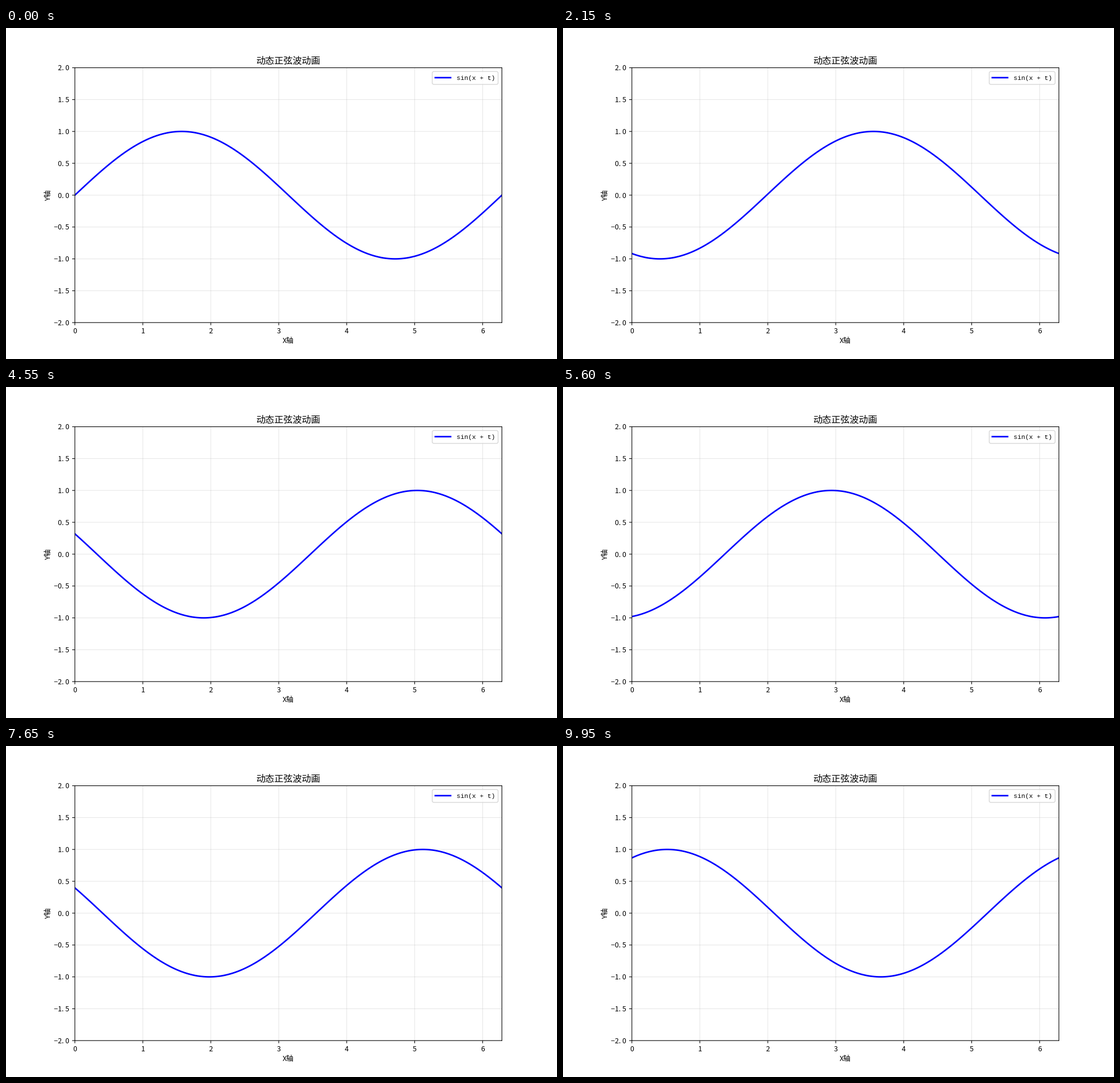
Recreate the animation shown at these times as a matplotlib script. Size 966x580 px, loop 10000 ms.

```python
import matplotlib.pyplot as plt
import numpy as np
from matplotlib.animation import FuncAnimation
from matplotlib.lines import Line2D
from matplotlib.patches import FancyBboxPatch
from matplotlib.transforms import Affine2D

W, H, DPI = 966, 580, 96
FRAMES, INTERVAL = 200, 50
PHASE_STEP = 0.1
SANS, MONO = "Noto Sans CJK JP", "Liberation Mono"
LEFT, RIGHT, TOP, BOTTOM = 0.125 * W, 0.9 * W, 0.12 * H, 0.89 * H
TICK = 4.7

# Keep lines at their true subpixel positions
plt.rcParams["path.snap"] = False
plt.rcParams["path.simplify"] = False

fig = plt.figure(figsize=(W / DPI, H / DPI), dpi=DPI, facecolor="white")
ax = fig.add_axes([0.125, 0.11, 0.775, 0.77])

# Stage pixels, measured from the top left corner
stage = Affine2D().scale(1, -1).translate(0, H).scale(1 / DPI) + fig.dpi_scale_trans


def label(x, y, text, size, ha="center", font=SANS, rotation=0):
    """Write text with its baseline at stage position (x, y)."""
    fig.text(x, y, text, transform=stage, fontsize=size, family=font,
             ha=ha, va="baseline", rotation=rotation,
             rotation_mode="anchor", color="black")


def segment(x0, y0, x1, y1, color="black", width=0.8, cap="butt"):
    fig.add_artist(Line2D([x0, x1], [y0, y1], transform=stage, color=color,
                          linewidth=width, solid_capstyle=cap))


def tick_text(value):
    """One decimal, with the wide period of a half-width font."""
    return f"{value:.1f}".replace("-", "\u2212").replace(".", ". ")


def draw_axes():
    ax.set_xlim(0, 2 * np.pi)
    ax.set_ylim(-2, 2)
    ax.set_xticks(np.arange(7))
    ax.set_yticks(np.arange(-2, 2.1, 0.5))
    ax.tick_params(length=0, labelleft=False, labelbottom=False)
    ax.grid(True, alpha=0.3)

    for n in ax.get_xticks():
        x = LEFT + (RIGHT - LEFT) * n / (2 * np.pi)
        segment(x, BOTTOM, x, BOTTOM + TICK)
        label(x, 534.6, str(int(n)), 9.3)
    for v in ax.get_yticks():
        y = BOTTOM + (TOP - BOTTOM) * (v + 2) / 4
        segment(LEFT - TICK, y, LEFT, y)
        label(111.2, y + 4.6, tick_text(v), 9.3, ha="right")

    label(495, 62.5, "动态正弦波动画", 12.08)
    label(495, 552.2, "X轴", 9.5)
    label(77.6, 293, "Y轴", 9.5, rotation=90)


def draw_legend():
    fig.add_artist(FancyBboxPatch(
        (747.3, 76.3), 115.4, 22.5, transform=stage,
        boxstyle="round,pad=0,rounding_size=2.68",
        facecolor=(1, 1, 1, 0.8), edgecolor=(0.8, 0.8, 0.8, 0.8), linewidth=1))
    segment(752.6, 87, 779.5, 87, "blue", 2, "projecting")
    label(790.2, 91.4, "sin(x + t)", 8.4, ha="left", font=MONO)


draw_axes()
draw_legend()

xs = np.linspace(0, 2 * np.pi, 200)
wave, = ax.plot(xs, np.sin(xs), color="blue", linewidth=2)


def update(frame):
    wave.set_ydata(np.sin(xs + frame * PHASE_STEP))
    return wave,


anim = FuncAnimation(fig, update, frames=FRAMES, interval=INTERVAL,
                     repeat=True, repeat_delay=0, blit=False)
plt.show()
```
